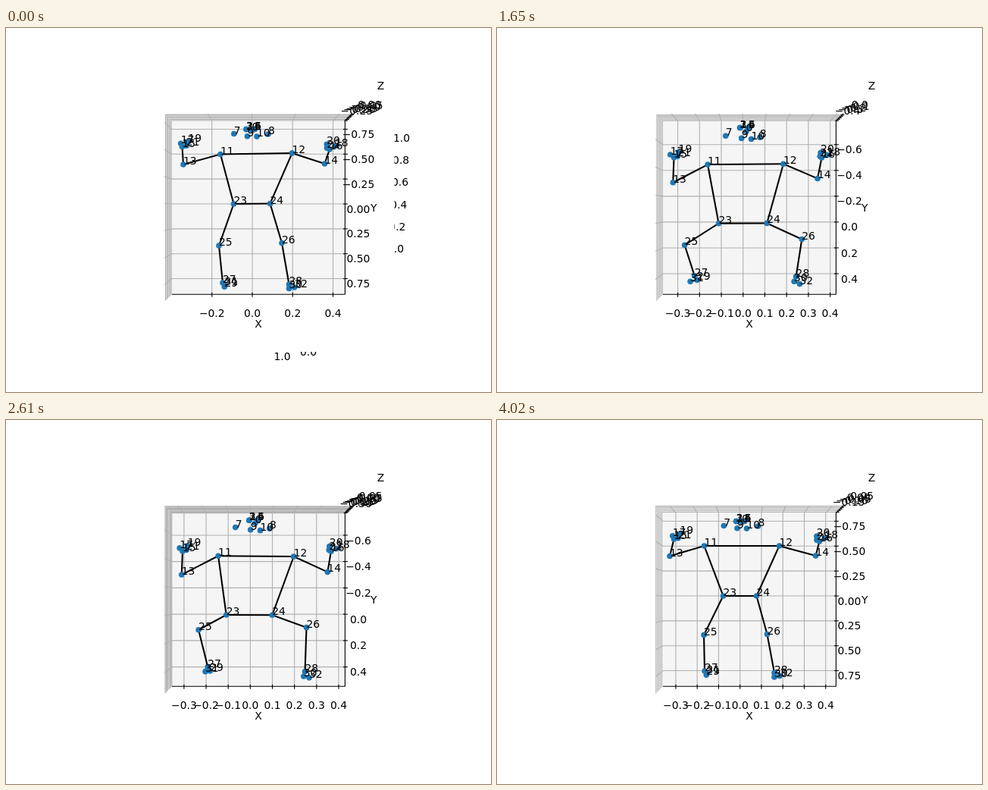
An HTML page that plays this animation: 640 px wide and 480 px high, repeating every 4.05 s.

```html
<!DOCTYPE html>
<html lang="en">
<head>
<meta charset="utf-8">
<title>Pose landmarks</title>
<style>
html, body { margin: 0; width: 100%; height: 100%; overflow: hidden; background: #fff; }
svg { display: block; width: 640px; height: 480px; }
text { font: 13.889px "DejaVu Sans", sans-serif; }
.axis-name { font-style: italic; }
.mid { text-anchor: middle; }
.end { text-anchor: end; }
.grid { stroke: #b0b0b0; stroke-width: 1.11; fill: none; }
.axis { stroke: #000; stroke-width: 1.11; fill: none; }
.bone { stroke: #000; stroke-width: 2.08; fill: none; stroke-linecap: square; }
.dot { fill: #1f77b4; }
</style>
</head>
<body>
<svg id="stage" viewBox="0 0 640 480">
  <clipPath id="rightEdge"><rect x="512.5" y="0" width="127" height="480"/></clipPath>
  <clipPath id="bottomEdge"><rect x="0" y="427" width="640" height="53"/></clipPath>
  <path fill="#f9f9f9" d="M209.2 113L219 122.8V351.2L209.2 361Z"/>
  <path fill="#f2f2f2" d="M209.2 113L219 122.8H447.4L457.2 113Z"/>
  <path fill="#f5f5f5" d="M219 122.8H447.4V351.2H219Z"/>
  <g id="plot"></g>
  <g class="axis-name mid">
    <text x="333" y="394.5">X</text>
    <text x="485.3" y="242">Y</text>
    <text x="494.5" y="80.7">Z</text>
  </g>
  <g id="leftover"></g>
</svg>
<script>
const LOOP = 4050, STEP = 30;
const CX = 333.2, CY = 237, BACK = 114.2, NEAR = 124, PAD = 4.6;
const plot = document.getElementById('plot');
const leftover = document.getElementById('leftover');

// Joints listed in each pose; every other landmark follows one of them.
const JOINTS = [3, 11, 12, 13, 14, 15, 16, 23, 24, 25, 26, 27, 28];
const BONES = [[11, 12], [11, 13], [13, 15], [12, 14], [14, 16], [11, 23], [12, 24], [23, 24],
  [23, 25], [25, 27], [24, 26], [26, 28], [27, 29], [29, 31], [28, 30], [30, 32]];

const poses = [];
// axes: x origin, x px per unit, y origin, y px per unit, z min, z max
const pose = (time, squat, axes, joints) => poses.push({ time, v: [squat, ...axes, ...joints] });

pose(0, 0, [325, 266.3, 232, 131.4, -0.27, 0.04], [317, 133.5, 283, 166.5, 377.5, 165,
  234, 180, 420.5, 179, 232.5, 156.5, 427, 160, 300.5, 232, 348.5, 231.5,
  281, 287, 364, 283.5, 286, 336, 373.5, 338]);
pose(780, 0, [323, 284, 232.3, 130.4, -0.22, 0.06], [315, 133, 277.5, 166.5, 374, 165,
  232, 179, 420.5, 178, 232.5, 156, 425.5, 159, 300, 232, 344.5, 232,
  276.5, 285, 361.5, 282.5, 279.5, 334, 371, 335]);
pose(1320, 0.3, [323.3, 296.5, 240.5, 146.2, -0.42, 0.11], [315, 131, 275, 172, 374.5, 170.5,
  229, 191, 424.5, 188.5, 231.5, 163, 428.5, 166.5, 295, 241, 349.5, 240.5,
  254, 287.5, 382.5, 281.5, 258, 331, 388, 332]);
pose(1980, 1, [326, 278, 272.5, 196.5, -0.43, 0.07], [326, 132, 281.5, 187.5, 381, 188,
  235.5, 216, 421.5, 208, 235.5, 178, 428.5, 175, 290, 275, 361, 275.5,
  242.5, 283, 418, 273.5, 263.5, 321.5, 401, 325]);
pose(2340, 1, [322, 302.5, 280.5, 212.3, -0.34, 0.11], [324, 131, 282, 190, 380.5, 191.5,
  235.5, 222.5, 424, 214, 234, 181, 430, 178, 286.5, 282.5, 355, 283.5,
  237, 269, 422.5, 266, 257, 315.5, 411, 326]);
pose(2880, 0, [322.7, 280.5, 231.8, 134.4, -0.27, 0.04], [318, 133.5, 277.5, 168, 378.5, 168,
  228, 184.5, 424.5, 185.5, 232.5, 163.5, 427.5, 167, 295.5, 231.5, 348.5, 231,
  271.5, 284.5, 368, 281.5, 275.5, 335.5, 376, 337]);
pose(4020, 0, [320.7, 282.5, 232, 131.4, -0.18, 0.06], [315.5, 133.5, 273.5, 166, 372.5, 166,
  228, 179.5, 420.5, 179, 233.5, 157, 425.5, 160, 298.5, 232, 342.5, 232,
  273, 283.5, 356.5, 282.5, 274, 331, 366, 333.5]);

const followers = [];
// Offset from the anchor while standing and while squatting.
const follow = (anchor, id, stand, squat) => followers.push({ anchor, id, stand, squat });
follow(3, 0, [7.5, 1], [8.7, 6.5]);
follow(3, 1, [0.4, 0], [0.4, 0]);
follow(3, 2, [0.2, 0], [0.2, 0]);
follow(3, 4, [10.8, 0], [11.3, 0.4]);
follow(3, 5, [11, 0], [11.5, 0.4]);
follow(3, 6, [11.2, 0], [11.7, 0.4]);
follow(3, 7, [-16.2, 6], [-19.8, 12.7]);
follow(3, 8, [29, 6.5], [25.3, 15.3]);
follow(3, 9, [1.4, 9.2], [2.5, 15.8]);
follow(3, 10, [14, 9.6], [15.5, 17.2]);
follow(15, 17, [-1.8, -4.3], [-6, -3.7]);
follow(15, 19, [8, -6.6], [5.3, -7]);
follow(15, 21, [5.5, -1.3], [4.5, -1.7]);
follow(16, 18, [7, -4.3], [7, -3]);
follow(16, 20, [-3.7, -6.8], [-0.5, -6.5]);
follow(16, 22, [-3.5, -1.8], [-1.7, -1.7]);
follow(27, 29, [2.3, 5.2], [3.5, 5.6]);
follow(27, 31, [2.6, 3], [-9, 9.3]);
follow(28, 30, [0, 5.4], [-3.5, 6.8]);
follow(28, 32, [7, 4], [4, 12]);

// Monotone cubic interpolation over the poses.
const secant = (i, k) => (poses[i + 1].v[k] - poses[i].v[k]) / (poses[i + 1].time - poses[i].time);
function slope(i, k) {
  if (i === 0 || i === poses.length - 1) return 0;
  const a = secant(i - 1, k), b = secant(i, k);
  return a * b <= 0 ? 0 : 2 * a * b / (a + b);
}
function stateAt(time) {
  let i = 0;
  while (i < poses.length - 2 && time >= poses[i + 1].time) i++;
  const from = poses[i], to = poses[i + 1], span = to.time - from.time;
  const u = (time - from.time) / span, w = 1 - u;
  return from.v.map((a, k) => (1 + 2 * u) * w * w * a + u * w * w * span * slope(i, k)
    + u * u * (3 - 2 * u) * to.v[k] - u * u * w * span * slope(i + 1, k));
}

function ticks(min, max) {
  const raw = (max - min) / 8;
  const step = [0.02, 0.025, 0.05, 0.1, 0.2, 0.25, 0.5].find(s => s >= raw);
  const digits = step === 0.1 || step === 0.2 || step === 0.5 ? 1 : 2;
  const list = [];
  for (let n = Math.ceil(min / step); n * step <= max; n++) {
    list.push({ value: n * step, label: (n < 0 ? '\u2212' : '') + Math.abs(n * step).toFixed(digits) });
  }
  return list;
}

const num = n => n.toFixed(2);
const path = (cls, ...pts) => `<path class="${cls}" d="M${pts.map(p => p.map(num).join(' ')).join('L')}"/>`;
const text = (x, y, s, cls = '') => `<text class="${cls}" x="${num(x)}" y="${num(y)}">${s}</text>`;
const toNear = (n, c) => c + (n - c) * NEAR / BACK;

function drawAxes([, x0, kx, y0, ky, z0, z1]) {
  const left = CX - BACK, right = CX + BACK, top = CY - BACK, bottom = CY + BACK;
  let grid = '', axes = '', labels = '';
  for (const { value, label } of ticks((left + PAD - x0) / kx, (right - PAD - x0) / kx)) {
    const x = x0 + value * kx;
    grid += path('grid', [x, bottom], [x, top], [toNear(x, CX), CY - NEAR]);
    axes += path('axis', [x, bottom - 2.5], [x, bottom + 3.5]);
    labels += text(x, 381, label, 'mid');
  }
  for (const { value, label } of ticks((top + PAD - y0) / ky, (bottom - PAD - y0) / ky)) {
    const y = y0 + value * ky;
    grid += path('grid', [right, y], [left, y], [CX - NEAR, toNear(y, CY)]);
    axes += path('axis', [right - 2.5, y], [right + 3.5, y]);
    labels += text(465, y + 11.6, label, 'mid');
  }
  for (const { value, label } of ticks(z0, z1)) {
    const u = (value - z0) / (z1 - z0);
    const h = BACK + (NEAR - BACK) * (0.02 + 0.96 * u);
    grid += path('grid', [CX - h, CY + h], [CX - h, CY - h], [CX + h, CY - h]);
    axes += path('axis', [CX + h - 2, CY - h], [CX + h + 3, CY - h]);
    labels += text(461.5 + 21 * u, 114.5 - 10 * u, label, 'mid');
  }
  axes += path('axis', [left, bottom], [right, bottom]) + path('axis', [right, bottom], [right, top])
    + path('axis', [right, top], [CX + NEAR, CY - NEAR]);
  return grid + axes + labels;
}

function drawBody(state) {
  const squat = state[0], points = [];
  JOINTS.forEach((id, n) => { points[id] = [state[7 + 2 * n], state[8 + 2 * n]]; });
  for (const f of followers) {
    points[f.id] = points[f.anchor].map((p, k) => p + f.stand[k] + squat * (f.squat[k] - f.stand[k]));
  }
  return BONES.map(([a, b]) => path('bone', points[a], points[b])).join('')
    + points.map(([x, y]) => `<circle class="dot" cx="${num(x)}" cy="${num(y)}" r="3.8"/>`).join('')
    + points.map(([x, y], id) => text(x, y, id)).join('');
}

// Edges of an empty plot that show only at the very start of the loop.
leftover.innerHTML = '<g clip-path="url(#rightEdge)">'
  + [1, 0.8, 0.6, 0.4, 0.2, 0].map((v, n) =>
    text(533 - 0.6 * n - 0.2 * n * n, 150 + 29.2 * n, v.toFixed(1), 'end')).join('')
  + '</g><g clip-path="url(#bottomEdge)">'
  + text(364.5, 437.5, '1.0', 'mid') + text(399, 432, '0.0', 'mid') + '</g>';

let shown = -1;
function render(ms) {
  const frame = Math.floor((ms % LOOP) / STEP);
  if (frame === shown) return;
  shown = frame;
  const state = stateAt(frame * STEP);
  plot.innerHTML = drawAxes(state) + drawBody(state);
  leftover.style.display = frame === 0 ? '' : 'none';
}

let start = null;
function tick(now) {
  if (start === null) start = now;
  render(Math.max(0, now - start));
  requestAnimationFrame(tick);
}
render(0);
requestAnimationFrame(tick);
</script>
</body>
</html>
```
